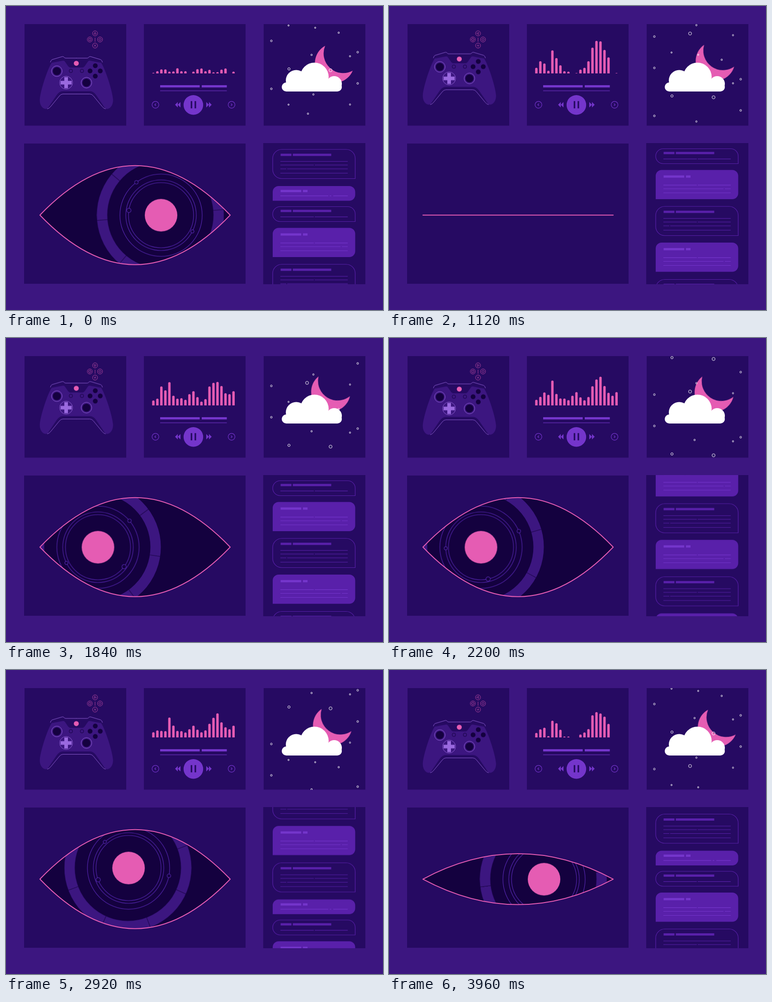
An HTML page for the animation above (4000 ms loop, 834 by 672 pixels).

```html
<!DOCTYPE html>
<html lang="en">
<head>
<meta charset="utf-8">
<title>Entertainment panels</title>
<style>
  :root {
    --bg: #3c1680; --panel: #260a62; --dark: #14013f; --pink: #e55cb3;
    --bright: #7435cb; --mid: #5920aa; --lilac: #9a69df;
  }
  html, body { margin: 0; width: 100%; height: 100%; overflow: hidden; background: var(--bg); }
  svg { display: block; width: 834px; height: 672px; fill: none; }
  .bg { fill: var(--bg); } .panel { fill: var(--panel); } .dark { fill: var(--dark); }
  .pink { fill: var(--pink); } .bright { fill: var(--bright); } .mid { fill: var(--mid); }
  .lilac { fill: var(--lilac); } .white { fill: #fff; }
  .line-bright { stroke: var(--bright); stroke-width: 1.2; }
  .line-mid { stroke: var(--mid); stroke-width: 1.2; }
  .line-lilac { stroke: var(--lilac); stroke-width: .9; }
  .line-dark { stroke: var(--dark); stroke-width: 1; }
  .line-pink { stroke: var(--pink); stroke-width: .9; stroke-opacity: .75; }
  .line-white { stroke: #fff; stroke-width: 1; }
  .orbit { stroke: #5b2bb8; stroke-width: 1.1; }

  #pad, #moon, #stars, #chat, #iris, .glyph, .turn { animation: 4s linear infinite; }
  #pad { animation-name: bob; }
  #moon { animation-name: tilt; transform-origin: 682px 170px; }
  #stars { animation-name: fall; }
  #chat { animation-name: scroll; animation-timing-function: ease-in-out; }
  #iris { animation-name: gaze; }
  .glyph { animation-name: glyph; }
  .turn { animation-name: turn; }

  @keyframes bob { 47.5% { transform: translateY(-16px); } }
  @keyframes tilt { 47.5% { transform: rotate(-10.4deg); } }
  @keyframes fall { to { transform: translateY(213.3px); } }
  @keyframes glyph { to { transform: rotate(144deg); } }
  @keyframes turn {
    from { transform: rotate(var(--from)); }
    to { transform: rotate(var(--to)); }
  }
  @keyframes scroll {
    0% { transform: translateY(0); }
    8%, 16% { transform: translateY(-80.5px); }
    26%, 46% { transform: translateY(-128px); }
    62%, 68% { transform: translateY(-254px); }
    76.5%, 81.5% { transform: translateY(-334px); }
    98%, 100% { transform: translateY(-414px); }
  }
  @keyframes gaze {
    0% { transform: translate(343px, 462.5px); animation-timing-function: step-end; }
    28% { transform: translate(203.5px, 462.5px); animation-timing-function: step-end; }
    59.5% { transform: translate(203.5px, 462.5px); animation-timing-function: ease-in-out; }
    84.5% { transform: translate(322px, 419px); animation-timing-function: step-end; }
    97.5%, 100% { transform: translate(343px, 462.5px); }
  }
</style>
</head>
<body>
<svg viewBox="0 0 834 672">
  <defs>
    <clipPath id="skyClip"><rect x="570" y="40" width="225" height="224.5"/></clipPath>
    <clipPath id="chatClip"><rect x="569" y="303" width="226" height="312"/></clipPath>
    <clipPath id="barClip"><rect x="305" y="40" width="225" height="109"/></clipPath>
    <clipPath id="lidClip"><path class="lid"/></clipPath>
    <g id="padHalf">
      <path class="bg" d="M156.2 136H143Q139 136 136 131L130.5 123Q128.5 120 125 121L101 125.5C92 139 76 187 74.7 207C74.3 218 80 227 88 227.5C91 227.5 93 225.5 95 222L112 197Q118 188.3 126 188.3H156.2Z"/>
      <path class="line-lilac" d="M98 124.5Q99.5 119.5 102 118.5L124.5 111.8Q127 111.3 128.5 113.3Q129.8 115.2 132 115.2H156M91 227.4Q95 227 99 222L118 199Q121.5 194.5 126 194.5H156"/>
    </g>
  </defs>

  <g class="panel">
    <rect x="41" y="40" width="225" height="224.5"/>
    <rect x="305" y="40" width="225" height="224.5"/>
    <rect x="570" y="40" width="225" height="224.5"/>
    <rect x="40" y="304" width="490" height="310"/>
    <rect x="569" y="303" width="226" height="312"/>
  </g>

  <!-- game controller -->
  <g class="line-pink">
    <g transform="translate(197 60.5)"><circle r="5.6"/><path class="glyph" d="M0-2.9L2.6 1.7H-2.6Z"/></g>
    <g transform="translate(185.5 74)"><circle r="5.6"/><path class="glyph" d="M-2.3-2.3H2.3V2.3H-2.3Z"/></g>
    <g transform="translate(208 74)"><circle r="5.6"/><circle r="2.5"/></g>
    <g transform="translate(197 87.5)"><circle r="5.6"/><path class="glyph" d="M-2.4-2.4L2.4 2.4M2.4-2.4L-2.4 2.4"/></g>
    <path d="M197 70V79"/>
  </g>
  <g id="pad">
    <use href="#padHalf"/>
    <use href="#padHalf" transform="translate(311.5) scale(-1 1)"/>
    <circle class="pink" cx="155.5" cy="126.7" r="5.5"/>
    <g class="line-lilac">
      <circle cx="112.5" cy="144" r="11.8"/>
      <circle cx="178" cy="169.5" r="11.8"/>
      <circle cx="133" cy="169.5" r="14.3"/>
    </g>
    <g class="dark">
      <circle cx="112.5" cy="144" r="8.8"/>
      <circle cx="178" cy="169.5" r="8.8"/>
      <circle cx="197.5" cy="132" r="5.3"/>
      <circle cx="186" cy="143.5" r="5.3"/>
      <circle cx="208.5" cy="143.5" r="5.3"/>
      <circle cx="197.5" cy="155" r="5.3"/>
    </g>
    <g class="line-dark"><circle cx="143.5" cy="143.5" r="3.8"/><circle cx="168" cy="143.5" r="3.8"/></g>
    <path class="lilac" d="M129 157.2H137V165.5H145.3V173.5H137V181.8H129V173.5H120.7V165.5H129Z"/>
  </g>

  <!-- music player -->
  <g id="bars" class="pink" clip-path="url(#barClip)"></g>
  <g class="bright">
    <path d="M341 175H428.5V180H341ZM433 175H488.5V180H433Z"/>
    <circle cx="414.5" cy="218.7" r="21.7"/>
    <path d="M374 218.3L380 212.3V224.3ZM380 218.3L386 212.3V224.3ZM455 218.3L449 212.3V224.3ZM449 218.3L443 212.3V224.3Z"/>
  </g>
  <path class="panel" d="M408.6 210.3H412V226.2H408.6ZM417.2 210.3H420.6V226.2H417.2Z"/>
  <g class="line-bright">
    <path d="M341 187.5H488.5M331.8 215.8L329.2 218.3L331.8 220.8M497.7 215.8L500.3 218.3L497.7 220.8"/>
    <circle cx="330.6" cy="218.3" r="7.5"/>
    <circle cx="499" cy="218.3" r="7.5"/>
  </g>

  <!-- night sky -->
  <g clip-path="url(#skyClip)">
    <path id="moon" class="pink" d="M706 88A43.5 43.5 0 1 0 767 143A43.5 43.5 0 0 1 706 88Z"/>
    <g id="stars" class="line-white"></g>
    <g class="white">
      <rect x="610" y="169" width="133" height="20" rx="10"/>
      <circle cx="642" cy="164.5" r="23"/>
      <circle cx="682.3" cy="156.7" r="31.5"/>
      <circle cx="726" cy="172" r="17"/>
    </g>
  </g>

  <!-- eye -->
  <g clip-path="url(#lidClip)">
    <rect class="dark" x="40" y="304" width="490" height="310"/>
    <g id="iris">
      <g transform="translate(-1.5 -.5)">
        <circle r="129" stroke="#3c1680" stroke-width="23"/>
        <g id="ticks" class="turn line-dark" style="--from:40deg;--to:265deg"></g>
      </g>
      <g id="orbits" class="orbit"></g>
      <circle class="pink" r="36"/>
    </g>
  </g>
  <path class="lid" stroke="#e55cb3" stroke-width="2" stroke-linejoin="round"/>

  <!-- messages -->
  <g clip-path="url(#chatClip)"><g id="chat"></g></g>
</svg>

<script>
const LOOP = 4000;
const fill = (id, parts) => { document.getElementById(id).innerHTML = parts.join(''); };

// Stars: [x, y, radius]; the repeating ones follow themselves one drop higher.
const DROP = 213;
const repeating = [
  [625, 43, 1.5], [684, 48, 1.5], [736, 59, 1.7], [587, 77, 2], [778, 102, 2], [676, 108, 1.7],
  [761, 111, 1.6], [626, 139, 2.6], [718, 142, 3.4], [778, 171, 2], [680, 195.5, 1.7], [761, 217.7, 1.6]
];
const single = [[587, 183, 2], [625, 218, 1.5], [668, 238, 1.7], [666, 1, 3.4], [587, 7.7, 2]];
const star = ([x, y, r]) => `<circle cx="${x}" cy="${y}" r="${r}"/>`;
fill('stars', [...repeating, ...repeating.map(([x, y, r]) => [x, y - DROP, r]), ...single].map(star));

// Iris ticks and orbiting dots.
fill('ticks', [...Array(8).keys()].map(i => `<path d="M117 0H141" transform="rotate(${i * 45})"/>`));
const orbits = [
  { radius: 91, dot: 4, from: 233.1, sweep: 188.8 },
  { radius: 78, dot: 3.5, from: 27.2, sweep: 274.6 },
  { radius: 72, dot: 4.8, from: 188.4, sweep: 452.4 }
];
fill('orbits', [
  ...orbits.map(o => `<circle r="${o.radius}"/>`),
  ...orbits.map(o => `<g class="turn" style="--from:${o.from}deg;--to:${o.from + o.sweep}deg">` +
    `<circle class="dark" cx="${o.radius}" r="${o.dot}"/></g>`)
]);

// Messages: line segments are [left, right] pairs at an offset from the top.
const FULL = [607, 756], HALVES = [[607, 681], [683, 756]];
const received = [[607.5, 631.5], [634.5, 719.5]], sent = [[607.5, 653], [657, 667]];
const kinds = {
  longIn: { h: 64.5, r: 20, title: 9.5, rows: [[26.5, [FULL]], [34.5, HALVES], [43, [[607, 620], [622, 756]]], [52.5, [FULL]]] },
  shortIn: { h: 33, r: 16.5, title: 7, rows: [[22.7, HALVES]] },
  shortOut: { h: 32.5, r: 13, out: true, title: 8.5, rows: [[21.7, [[607, 713], [716, 719.5], [724, 756]]]] },
  longOut: { h: 64.5, r: 13, out: true, title: 12, rows: [[33.3, HALVES], [41.5, [[607, 740], [743, 756]]], [50.5, [FULL]]] }
};
const thread = [['longIn', 317], ['shortOut', 398], ['shortIn', 443.5], ['longOut', 490.5], ['longIn', 571], ['longOut', 651]];
const THREAD_HEIGHT = 415.5;

function message([kind, y]) {
  const { h, r, out, title, rows } = kinds[kind];
  const left = 590, right = 772.5, bottom = y + h;
  const corner = (x, cy) => `A${r} ${r} 0 0 1 ${x} ${cy}`;
  const outline = `M${left + r} ${y}H${right - r}${corner(right, y + r)}` +
    (out ? `V${bottom - r}${corner(right - r, bottom)}H${left}` : `V${bottom}H${left + r}${corner(left, bottom - r)}`) +
    `V${y + r}${corner(left + r, y)}Z`;
  const heads = (out ? sent : received).map(([a, b]) => `M${a} ${y + title}H${b}v5H${a}Z`).join('');
  const text = rows.map(([dy, spans]) => spans.map(([a, b]) => `M${a} ${y + dy}H${b}`).join('')).join('');
  const tone = out ? 'bright' : 'mid';
  return `<path class="${out ? 'mid' : 'line-mid'}" d="${outline}"/>` +
    `<path class="${tone}" d="${heads}"/><path class="line-${tone}" d="${text}"/>`;
}
fill('chat', [...thread, ...thread.map(([kind, y]) => [kind, y + THREAD_HEIGHT])].map(message));

// Equalizer levels over time; the last two bars echo the tenth and eleventh.
const levels = [
  [0, [1.5, 5, 9, 9, 4, 4.5, 11.5, 5, 5, 0, 4, 9.5, 11, 5, 8, 2.5, 3, 8.5, 11]],
  [400, [10, 10, 33, 25, 39, 17, 14, 13.5, 10, 16, 23, 16, 7, 10, 33, 37, 39, 36.5, 28]],
  [1120, [12.5, 27, 22, 6, 51, 34, 18, 5, 4, 0, 1, 8.5, 12.5, 27, 57, 72, 71, 52, 35.5]],
  [1840, [11, 15, 42, 33.5, 51.5, 21.5, 15, 16, 12.5, 25, 31.5, 18.5, 8.5, 14, 42, 50, 52, 43, 27]],
  [2520, [14, 22.5, 17, 14.5, 58, 29, 16, 14.5, 11, 18.5, 27.5, 17.5, 14, 23, 43, 64, 73.5, 43, 29]],
  [3520, [8, 5, 11, 13, 23, 22, 12, 13, 11, 18, 24, 17, 8, 5, 11, 13, 23, 19, 13]],
  [3960, [10, 18, 21.5, 3, 37, 31.5, 17, 2, 2, 0, 0, 6.5, 11, 18.5, 49, 56, 53, 46, 30]]
];
const BAR_COUNT = 21, BASELINE = 149;
fill('bars', [...Array(BAR_COUNT).keys()].map(i =>
  `<rect x="${323.3 + i * 8.865}" y="${BASELINE}" width="5.4" height="90" rx="2.7"/>`));
const bars = [...document.querySelectorAll('#bars rect')];

const lidKeys = [[0, 1], [1000, 1], [1080, 0], [1160, 0], [1240, 1], [3800, 1], [3880, 0], [3920, 0], [4000, 1]];
const lids = document.querySelectorAll('.lid');

// Finds the pair of keys around a time and the progress between them.
function between(keys, time) {
  const next = keys.findIndex(([at]) => at > time);
  if (next < 0) return [keys.at(-1)[1], keys.at(-1)[1], 0];
  const [[t0, a], [t1, b]] = [keys[next - 1], keys[next]];
  return [a, b, (time - t0) / (t1 - t0)];
}
const mix = (a, b, p) => a + (b - a) * p;

function drawBars(time) {
  const [a, b, p] = between(levels, time);
  bars.forEach((bar, i) => {
    const n = i < 19 ? i : i - 10;
    bar.setAttribute('y', BASELINE - mix(a[n], b[n], p));
  });
}

function drawLids(time) {
  const bulge = 146 * mix(...between(lidKeys, time));
  const top = 462.3 - bulge, bottom = 462.3 + bulge;
  const d = `M75 462.3C215 ${top} 356 ${top} 496 462.3C356 ${bottom} 215 ${bottom} 75 462.3Z`;
  lids.forEach(lid => lid.setAttribute('d', d));
}

const start = performance.now();
function draw() {
  const time = (performance.now() - start) % LOOP;
  drawBars(time);
  drawLids(time);
  requestAnimationFrame(draw);
}
draw();
</script>
</body>
</html>
```
